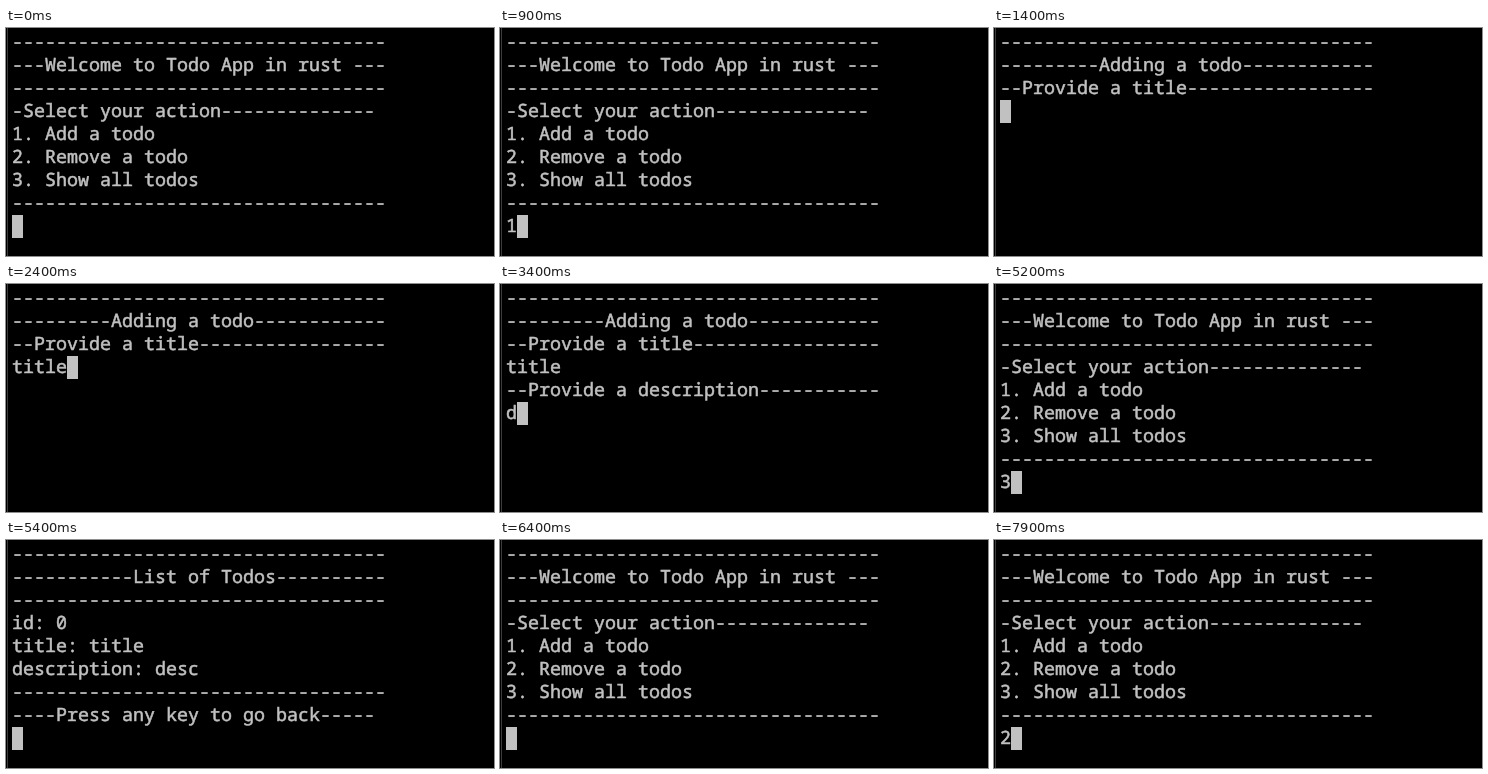
These frames come from a looping animation (488 by 228 pixels, 8 s). An HTML page:

```html
<!DOCTYPE html>
<html lang="en">
<head>
<meta charset="utf-8">
<title>Todo app in a terminal</title>
<style>
  html, body { margin: 0; width: 100%; height: 100%; overflow: hidden; background: #000; }
  body { position: relative; }
  #edge { position: absolute; left: 1px; top: 0; width: 1px; height: 100%; background: #3c3c3c; }
  #screen {
    position: absolute; left: 6px; top: 2px; margin: 0;
    font: 500 18.3333px/23px "Noto Sans Mono", "DejaVu Sans Mono", monospace;
    font-variant-ligatures: none; text-rendering: geometricPrecision;
    color: #c1c1c1; -webkit-text-stroke: 0.55px #c1c1c1;
  }
  #cursor { position: absolute; width: 11px; height: 23px; background: #c1c1c1; }
</style>
</head>
<body>
<div id="edge"></div>
<pre id="screen"></pre>
<div id="cursor"></div>
<script>
const LOOP = 8000, CELL = 11, ROW = 23, LEFT = 6, TOP = 3;
const screenEl = document.getElementById('screen');
const cursorEl = document.getElementById('cursor');

const banner = (lead, text, width = 34) => ('-'.repeat(lead) + text).padEnd(width, '-');
const page = (...lines) => lines.join('\n') + '\n';
const rule = banner(0, '');

const menu = page(
  rule, banner(3, 'Welcome to Todo App in rust '), rule,
  banner(1, 'Select your action', 33),
  '1. Add a todo', '2. Remove a todo', '3. Show all todos', rule);
const addTitle = page(rule, banner(9, 'Adding a todo'), banner(2, 'Provide a title'));
const addDescription = addTitle + page('title', banner(2, 'Provide a description'));
const list = page(
  rule, banner(11, 'List of Todos'), rule,
  'id: 0', 'title: title', 'description: desc', rule,
  banner(4, 'Press any key to go back', 33));

// Start time in ms and the terminal contents from then on.
const steps = [
  [0, menu], [700, menu + '1'],
  [1400, addTitle], [1600, addTitle + 't'], [1700, addTitle + 'ti'],
  [2000, addTitle + 'tit'], [2100, addTitle + 'titl'], [2200, addTitle + 'title'],
  [2500, addDescription], [3400, addDescription + 'd'],
  [3500, addDescription + 'de'], [3700, addDescription + 'desc'],
  [3900, menu], [5200, menu + '3'],
  [5400, list],
  [6400, menu], [7100, menu + '2']
];

let shown;
function render(time) {
  const text = steps.findLast(([start]) => start <= time)[1];
  if (text === shown) return;
  shown = text;
  const lines = text.split('\n');
  screenEl.textContent = text;
  cursorEl.style.left = LEFT + CELL * lines.at(-1).length + 'px';
  cursorEl.style.top = TOP + ROW * (lines.length - 1) + 'px';
}

const origin = performance.now();
function tick() {
  render((performance.now() - origin) % LOOP);
  requestAnimationFrame(tick);
}
tick();
</script>
</body>
</html>
```
